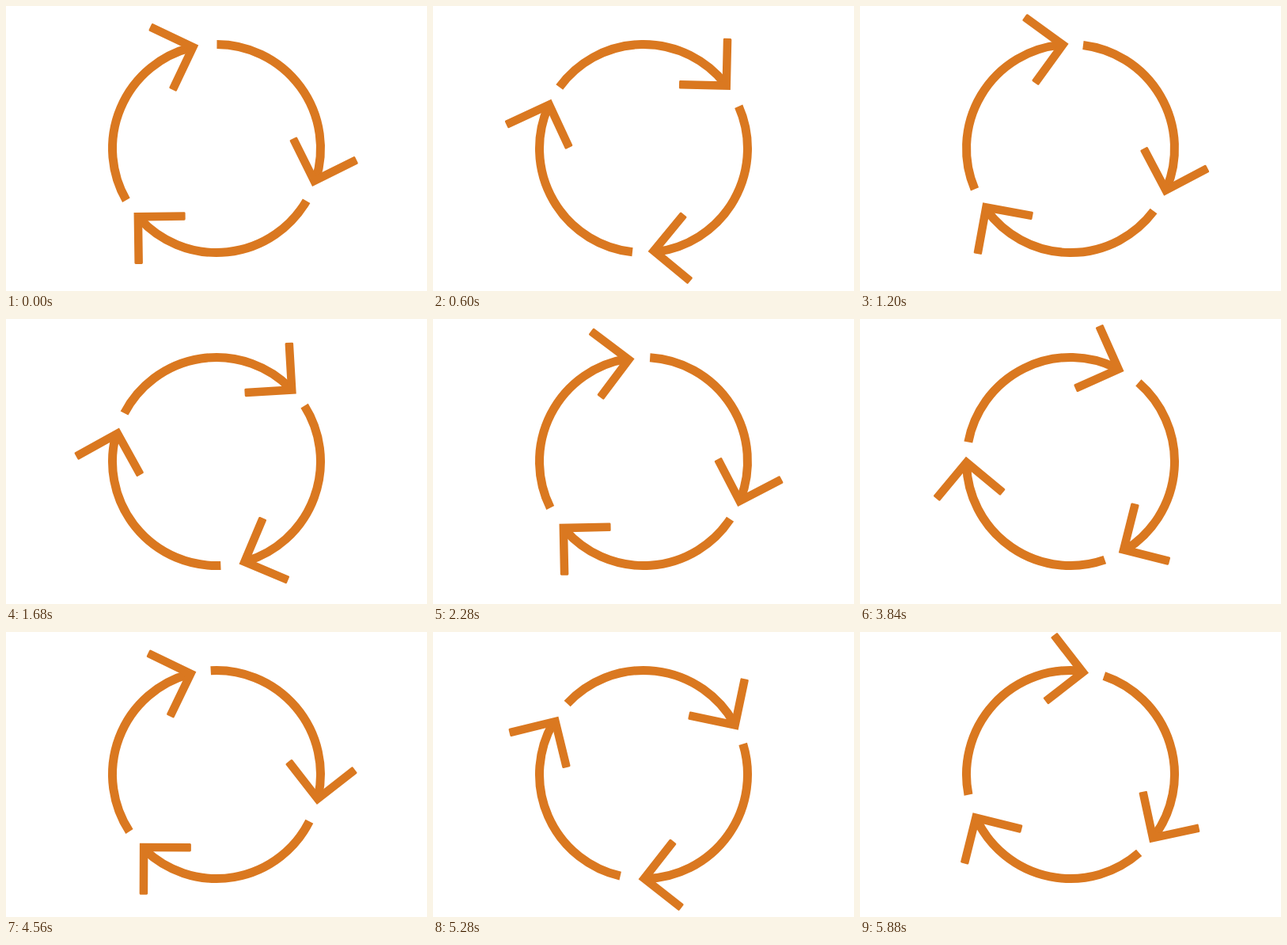
An HTML page for the animation above (6000 ms loop, 532x360 px).

```html
<!DOCTYPE html>
<html lang="en">
<head>
<meta charset="utf-8">
<title>Turning cycle arrows</title>
<style>
  html, body { margin: 0; width: 100%; height: 100%; overflow: hidden; background: #fff; }
  svg { display: block; width: 532px; height: 360px; }
  .arc { fill: none; stroke: #da7820; stroke-width: 11; }
  .head { fill: #da7820; }
</style>
</head>
<body>
<svg viewBox="0 0 532 360">
  <g transform="translate(266 180)"><g id="wheel"></g></g>
</svg>
<script>
const LOOP = 6000, STEP = 120;
const POSES = 72;            // the first and last pose of a turn coincide
const RADIUS = 131.5;

// tip: angle after the tail, r: tip radius, aim: heading relative to the tail
const arrows = [
  { tip: 111.4, r: 130.2, aim: 198.4 },
  { tip: 112.0, r: 132.2, aim: 194.0 },
  { tip: 109.9, r: 132.5, aim: 190.2 }
];

const wheel = document.getElementById('wheel');

// Angles run clockwise from the top.
function polar(deg, r) {
  const a = deg * Math.PI / 180;
  return (r * Math.sin(a)).toFixed(2) + ' ' + (-r * Math.cos(a)).toFixed(2);
}

function add(parent, name, attrs) {
  const el = document.createElementNS('http://www.w3.org/2000/svg', name);
  for (const key in attrs) el.setAttribute(key, attrs[key]);
  return parent.appendChild(el);
}

// A right-angled head with its corner at the origin, pointing up and left
const HEAD = 'M0 0H63.5q1.5 0 1.5 1.5V9q0 1.5 -1.5 1.5H10.5V63.5' +
             'q0 1.5 -1.5 1.5H1.5q-1.5 0 -1.5 -1.5Z';

arrows.forEach(({ tip, r, aim }, i) => {
  const g = add(wheel, 'g', { transform: `rotate(${i * 120})` });
  add(g, 'path', {
    class: 'arc',
    d: `M${polar(0, RADIUS)}A${RADIUS} ${RADIUS} 0 0 1 ${polar(tip - 4.5, RADIUS)}`
  });
  add(g, 'path', {
    class: 'head',
    d: HEAD,
    transform: `translate(${polar(tip, r)}) rotate(${aim + 45})`
  });
});

// Each step moves on by two or three poses in turn.
function angleAt(ms) {
  const step = Math.floor((ms % LOOP) / STEP);
  const pose = Math.floor(step * 2.5 + 0.5) % POSES;
  return pose * 360 / (POSES - 1) + 0.2;
}

function draw(now) {
  wheel.setAttribute('transform', `rotate(${angleAt(now).toFixed(3)})`);
  requestAnimationFrame(draw);
}

wheel.setAttribute('transform', `rotate(${angleAt(0)})`);
requestAnimationFrame(draw);
</script>
</body>
</html>
```
